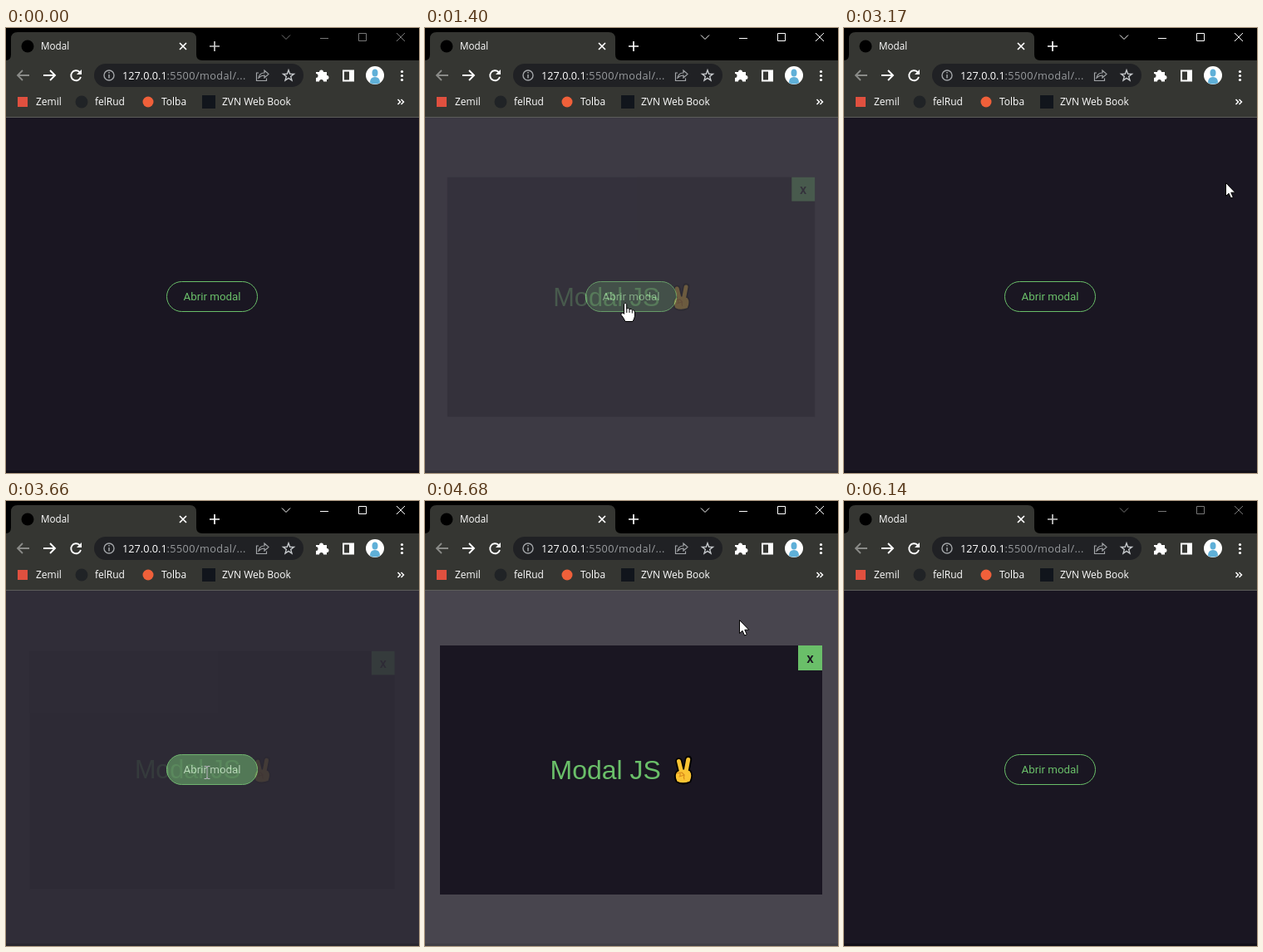
An HTML page that plays this animation: 497x536 px, repeating every 6.2 s.

```html
<!DOCTYPE html>
<html lang="pt">
<head>
<meta charset="utf-8">
<title>Modal</title>
<style>
html, body { margin: 0; width: 100%; height: 100%; overflow: hidden; background: #1a1622; }
svg { display: block; width: 497px; height: 536px; }
.ui { font: 12px "Open Sans", "Noto Sans", sans-serif; fill: #fff; }
.url { font-size: 12.7px; }
.line { fill: none; stroke: #fff; }
</style>
</head>
<body>
<svg viewBox="0 0 497 536">
  <rect width="497" height="536" fill="#1a1622"/>
  <rect y="533" width="497" height="3" opacity=".3"/>

  <g id="openBtn">
    <rect id="openFill" x="193.5" y="305.5" width="109" height="36" rx="18" fill="#6abf69" fill-opacity="0" stroke="#6abf69"/>
    <text id="openText" x="248" y="328" text-anchor="middle" font-family="Roboto, sans-serif" font-size="13.33" fill="#6abf69">Abrir modal</text>
  </g>

  <rect id="overlay" y="108" width="497" height="428" fill="#fff"/>
  <g id="modal">
    <rect x="18" y="174" width="460" height="300" fill="#1a1622"/>
    <rect id="closeBtn" x="449" y="174" width="29" height="30" fill="#6abf69"/>
    <text x="463.5" y="195" text-anchor="middle" font-family="Roboto, sans-serif" font-size="17" font-weight="500" fill="#1a1622">x</text>
    <text x="150.5" y="335" font-family="'Liberation Sans', Arial, sans-serif" font-size="32" fill="#6abf69">Modal JS</text>
    <g stroke-linecap="round" stroke-linejoin="round" fill="none">
      <g stroke="#000">
        <path d="M305.500 313.500L308.500 326M317 311L314 326" stroke-width="8.500"/>
        <path d="M304 327Q310 322 318 326Q321 330 318 337Q310 341 304 337Q301 331 304 327Z" stroke-width="5"/>
      </g>
      <path d="M305.500 313.500L308.500 326M316.700 311.500L314 326" stroke="#fcc433" stroke-width="5"/>
      <path d="M304 327Q310 322 318 326Q321 330 318 337Q310 340 304 337Q301 331 304 327Z" stroke="#fcc433" stroke-width="1.500" fill="#fcc433"/>
      <path d="M303 328L309 327L312 330L306 332M307 327V331M312 330Q311 333 312 335" stroke="#d98a1c" stroke-width="1.200"/>
    </g>
  </g>

  <rect width="497" height="40"/>
  <path d="M0 39Q6 39 6 32V13Q6 5 14 5H221Q229 5 229 13V32Q229 39 236 39H497V107H0Z" fill="#353632"/>
  <rect y="107" width="497" height="1" fill="#5d5d5b"/>
  <circle cx="26" cy="22" r="7.500"/>
  <text class="ui" x="42" y="26" style="font-size:11.700px">Modal</text>
  <path class="line" d="M209 18l8 8m0-8l-8 8" stroke-width="1.700"/>

  <g id="controls" class="line">
    <path d="M245 22h12m-6-6v12" stroke-width="1.700" id="plus"/>
    <path d="M332 8.500l5 5 5-5M378 12.500h10M424.500 6.500h9v9h-9zM470 6l10 10m0-10l-10 10"/>
  </g>

  <path class="line" d="M28 57H14m6-6l-6 6 6 6" style="stroke:#8a8b88" stroke-width="1.800"/>
  <path class="line" d="M45 57h14m-6-6l6 6-6 6" stroke-width="1.900"/>
  <path class="line" d="M88.500 53A6 6 0 1 0 90 59" stroke-width="1.900"/>
  <path d="M91 50v6h-6z" fill="#fff"/>

  <rect x="106" y="43" width="252" height="28" rx="14" fill="#202124"/>
  <g class="line" style="stroke:#a3a6a9">
    <circle cx="124" cy="57" r="6" stroke-width="1.400"/>
    <path d="M124 56v4.500m0-7.500v1.500" stroke-width="1.500"/>
    <path d="M304 54h-2.500v9.500h12v-3M304 60q1-6 7-6v-3l5 4.500-5 4.500v-3q-4 0-7 3z" stroke-width="1.200"/>
    <path id="star" stroke-width="1.400" style="stroke:#c4c7ca"/>
  </g>
  <text class="ui url" x="140" y="62">127.0.0.1</text>
  <text class="ui url" x="193.500" y="62" style="fill:#989b9e" letter-spacing=".4">:5500/modal/...</text>

  <path d="M373 53h4a2.500 2.500 0 1 1 5 0h4v4a2.500 2.500 0 1 1 0 5v2.500h-4a2.300 2.300 0 1 0-5 0h-4v-4.500a2.300 2.300 0 1 0 0-5z" fill="#fff"/>
  <path class="line" d="M406 51.500h12v12h-12z" stroke-width="2"/>
  <path d="M413 51h6v13h-6z" fill="#fff"/>
  <circle cx="444" cy="57" r="11" fill="#fff"/>
  <g fill="#5fb0d8">
    <ellipse cx="444" cy="54" rx="3.500" ry="4.500"/>
    <path d="M438 66q0-7 6-7t6 7q-6 3-12 0z"/>
  </g>
  <g fill="#fff"><circle cx="476.500" cy="52.500" r="1.600"/><circle cx="476.500" cy="57.500" r="1.600"/><circle cx="476.500" cy="62.500" r="1.600"/></g>

  <rect x="14" y="83" width="12" height="12" fill="#e0503f"/>
  <circle cx="91" cy="89" r="7.500" fill="#202326"/>
  <circle cx="171" cy="89" r="6.500" fill="#f0603a"/>
  <rect x="236" y="81" width="16" height="16" fill="#11151c"/>
  <g class="ui">
    <text x="36" y="93">Zemil</text>
    <text x="107" y="93">felRud</text>
    <text x="187" y="93">Tolba</text>
    <text x="260" y="93">ZVN Web Book</text>
  </g>
  <path class="line" d="M471.500 86l3 3-3 3m4-6l3 3-3 3" stroke-width="1.500"/>

  <g id="pointer">
    <circle id="press" r="15" fill="#ff0" opacity=".6"/>
    <path id="arrow" d="M.5 .5V16.500L4 13.200 6.600 19 9.300 17.800 6.800 12.200H11.800Z" fill="#fff" stroke="#000"/>
    <g id="hand">
      <path d="M-1.500 1.500Q0 -.8 1.700 1.500V7Q4 5.800 5 7.700 7.500 6.800 8.300 8.700 11 8 11.500 11V16Q11 19 9 22.500H0Q-2 18-5 14.500-5.500 11.500-3 12L-1.500 13.500Z" fill="#fff" stroke="#000"/>
      <path d="M1.800 7v5M5 8v4M8.300 9v3.500" stroke="#000"/>
    </g>
    <path id="beam" d="M-3.500 -7.500H-1Q0 -7.500 0 -6 0 -7.500 1 -7.500H3.500M0 -6.500V6.500M-3.500 7.500H-1Q0 7.500 0 6 0 7.500 1 7.500H3.500" fill="none" stroke="#b9b6bf"/>
  </g>
</svg>
<script>
const LOOP = 6200;
const OPENS = [1260, 3575], CLOSES = [2760, 5380];
const PRESSES = [[1150, 1260], [2580, 2760], [3490, 3575], [5270, 5380]];
const OVERLAY_MS = 300, MODAL_MS = 450, HOVER_MS = 200;
// time, x, y, easing into this point
const PATH = [
  [540, 285, 528], [830, 250, 345, "linear"], [1100, 241, 331, "out"],
  [1930, 241, 331], [2540, 459, 186, "smooth"], [3230, 459, 186],
  [3480, 242, 327, "smooth"], [4160, 242, 327], [4490, 378, 144, "smooth"],
  [4649, 378, 144], [4650, 378, 143], [5390, 378, 143], [5880, 455, 540, "smooth"]
];
const $ = id => document.getElementById(id);
const clamp = v => Math.min(1, Math.max(0, v));
const mix = (a, b, p) => a + (b - a) * p;
const rgb = (a, b, p) => `rgb(${a.map((v, i) => Math.round(mix(v, b[i], p)))})`;
const ramp = (t, start, ms) => clamp((t - start) / ms);
const EASE = {
  linear: p => p,
  out: p => 1 - (1 - p) ** 2,
  smooth: p => p * p * (3 - 2 * p)
};

// CSS "ease": cubic-bezier(.25, .1, .25, 1)
function cssEase(x) {
  const curve = (a, b, s) => 3 * a * s * (1 - s) ** 2 + 3 * b * s * s * (1 - s) + s ** 3;
  let lo = 0, hi = 1;
  for (let i = 0; i < 20; i++) {
    const mid = (lo + hi) / 2;
    if (curve(.25, .25, mid) < x) lo = mid; else hi = mid;
  }
  return curve(.1, 1, lo);
}

const shown = (t, ms, ease) => OPENS.reduce((sum, start, i) =>
  sum + ease(ramp(t, start, ms)) - ease(ramp(t, CLOSES[i], ms)), 0);

function pointerAt(t) {
  const i = PATH.findIndex(k => k[0] > t);
  if (i < 0) return PATH[PATH.length - 1].slice(1, 3);
  if (i === 0) return [0, 600];
  const a = PATH[i - 1], b = PATH[i];
  const p = EASE[b[3] || "linear"]((t - a[0]) / (b[0] - a[0]));
  return [mix(a[1], b[1], p), mix(a[2], b[2], p)];
}

function pointerKind(t, x, y) {
  const open = (t > 1430 && t < 2990) || (t > 3645 && t < 5610);
  if (!open) return x > 193 && x < 303 && y > 305 && y < 342 ? "hand" : "arrow";
  if (x > 449 && x < 478 && y > 174 && y < 204) return "hand";
  return x > 152 && x < 323 && y > 306 && y < 342 ? "beam" : "arrow";
}

function draw(t) {
  const overlay = clamp(shown(t, OVERLAY_MS, cssEase));
  const fade = clamp(shown(t, MODAL_MS, EASE.linear));
  const scale = mix(.95, 1, EASE.smooth(fade));
  $("overlay").setAttribute("opacity", overlay * .2);
  $("modal").setAttribute("opacity", overlay * fade);
  $("modal").setAttribute("transform", `translate(248 324) scale(${scale}) translate(-248 -324)`);

  const hover = ramp(t, 870, HOVER_MS) - ramp(t, 1260, HOVER_MS)
    + ramp(t, 3375, HOVER_MS) - ramp(t, 3575, HOVER_MS);
  $("openFill").setAttribute("fill-opacity", hover);
  $("openText").setAttribute("fill", rgb([106, 191, 105], [255, 255, 255], hover));
  const closeHover = ramp(t, 2400, HOVER_MS) - ramp(t, 2990, HOVER_MS);
  $("closeBtn").setAttribute("fill", rgb([106, 191, 105], [82, 146, 82], closeHover));

  const active = t >= 1150 && t < 6140;
  $("controls").style.stroke = active ? "#fff" : "#777";
  $("plus").style.stroke = active ? "#fff" : "#c8c8c8";

  const [x, y] = pointerAt(t).map(Math.round);
  const kind = pointerKind(t, x, y);
  $("pointer").setAttribute("transform", `translate(${x} ${y})`);
  for (const id of ["arrow", "hand", "beam"]) $(id).style.display = id === kind ? "" : "none";
  $("press").style.display = PRESSES.some(([a, b]) => t >= a && t < b) ? "" : "none";
}

const star = Array.from({ length: 10 }, (_, i) => {
  const a = i * Math.PI / 5, r = i % 2 ? 2.8 : 6.8;
  return `${340 + r * Math.sin(a)} ${57.5 - r * Math.cos(a)}`;
});
$("star").setAttribute("d", `M${star.join("L")}Z`);

const begin = performance.now();
function tick() {
  draw((performance.now() - begin) % LOOP);
  requestAnimationFrame(tick);
}
tick();
</script>
</body>
</html>
```
